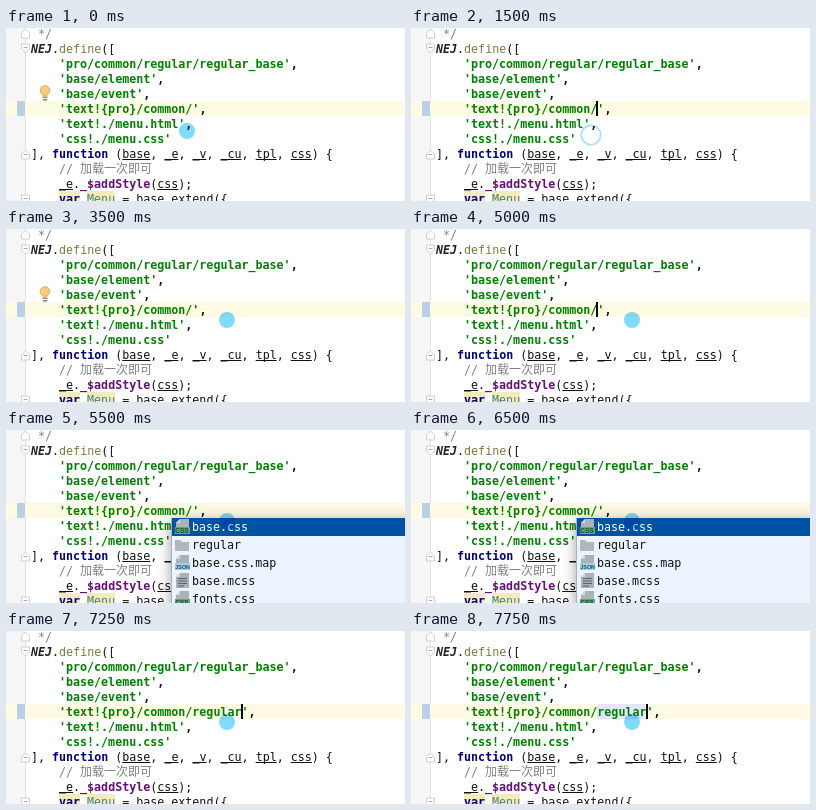
An HTML page with a canvas for the animation above (8 s loop, 399x173 px).

```html
<!DOCTYPE html>
<html lang="en">
<head>
<meta charset="utf-8">
<title>Path completion</title>
<style>
  html, body { margin: 0; width: 100%; height: 100%; overflow: hidden; background: #fff; }
  canvas { display: block; width: 399px; height: 173px; }
</style>
</head>
<body>
<canvas id="stage" width="399" height="173"></canvas>
<script>
const ctx = document.getElementById('stage').getContext('2d');
const W = 399, H = 173, LOOP = 8000;
const CHAR = 7.02, LEFT = 25, INDENT = 53, ROW = 15;
const MONO = '11.66px "DejaVu Sans Mono", monospace';
const STYLES = {
  plain: ['', '#111'],
  param: ['', '#111'],
  comma: ['bold ', '#111'],
  string: ['bold ', '#008000'],
  keyword: ['bold ', '#000080'],
  member: ['bold ', '#660e7a'],
  global: ['italic bold ', '#222'],
  method: ['', '#7a7a43'],
  local: ['', '#458383'],
  comment: ['', '#808080']
};

// Each entry lists the moment (ms) from which its values hold.
const pointerTrack = [
  [0, 181, 103], [250, 195, 102], [500, 187, 94], [750, 185, 91],
  [1000, 185, 87], [1250, 184, 87], [1500, 180, 107, 0.5],
  [1750, 217, 111, 0.5], [2000, 217, 111, 0.35], [2250, 221, 91]
];
const caretTrack = [
  [0, false], [1500, true], [2500, false], [3000, true], [3500, false],
  [4000, true], [5500, false], [6000, true], [6500, false], [6750, true]
];
const pathTrack = [
  [0, '/'], [4500, ''], [5000, '/'], [6750, '/reg'], [7000, '/regu'], [7250, '/regular']
];
const bulbTrack = [[0, true], [1500, false], [2500, true], [4500, false]];
const popupTrack = [[0, ''], [5500, 'files'], [6750, 'match'], [7250, '']];

const at = (track, t) => track.filter(entry => entry[0] <= t).pop().slice(1);
const baseline = row => 10 + ROW * row;

function rect(x, y, w, h, color) {
  ctx.fillStyle = color;
  ctx.fillRect(x, y, w, h);
}

function text(str, x, y, color, font = MONO) {
  ctx.font = font;
  ctx.fillStyle = color;
  ctx.fillText(str, x, y);
}

function polygon(points, fill, stroke) {
  ctx.beginPath();
  points.forEach(([x, y]) => ctx.lineTo(x, y));
  ctx.closePath();
  ctx.fillStyle = fill;
  ctx.fill();
  if (stroke) {
    ctx.strokeStyle = stroke;
    ctx.lineWidth = 1;
    ctx.stroke();
  }
}

// Tokens alternate between style and text.
function codeLine(row, x, ...tokens) {
  const y = baseline(row);
  for (let i = 0; i < tokens.length; i += 2) {
    const [weight, color] = STYLES[tokens[i]], str = tokens[i + 1];
    text(str, x, y, color, weight + MONO);
    if (tokens[i] === 'param') rect(x, y + 1, str.length * CHAR, 1, '#111');
    x += str.length * CHAR;
  }
}

function foldMark(y, dir, minus) {
  const x = 19.5;
  polygon([[x - 4, y - 4 * dir], [x + 4, y - 4 * dir], [x + 4, y + dir],
           [x, y + 5 * dir], [x - 4, y + dir]], '#fff', '#cfcfcf');
  if (minus) rect(x - 2, y - 1, 4, 1, '#aaa');
}

function bulb() {
  ctx.beginPath();
  ctx.arc(39, 62.5, 4.8, 0, Math.PI * 2);
  ctx.fillStyle = '#f8cb80';
  ctx.fill();
  ctx.strokeStyle = '#e0a95a';
  ctx.lineWidth = 1;
  ctx.stroke();
  rect(36.5, 66, 5, 3, '#f0bd70');
  rect(36.5, 69, 5, 1, '#888');
  rect(36.5, 71, 5, 1, '#888');
  rect(37.5, 72, 3, 1, '#aaa');
}

function editor(t, path, caretOn) {
  rect(0, 0, W, H, '#fff');
  rect(0, 0, 19, H, '#f6f6f6');
  rect(19, 0, 1, H, '#e4e4e4');
  rect(0, 73, W, ROW, '#fffae3');
  rect(11, 73, 8, ROW, '#b9d0e6');
  foldMark(6, -1, false);
  foldMark(20, 1, true);
  foldMark(127, -1, true);
  foldMark(171, 1, true);

  if (t >= 7750) rect(186, 73, 48, ROW, '#e4e4ff');
  rect(INDENT, 163, 3 * CHAR, ROW, '#f5eabb');
  rect(INDENT + 4 * CHAR, 163, 4 * CHAR, ROW, '#f5eabb');

  codeLine(0, LEFT, 'comment', ' */');
  codeLine(1, LEFT, 'global', 'NEJ', 'plain', '.', 'method', 'define', 'plain', '([');
  const modules = ['pro/common/regular/regular_base', 'base/element', 'base/event',
                   'text!{pro}/common' + path, 'text!./menu.html', 'css!./menu.css'];
  modules.forEach((name, i) =>
    codeLine(i + 2, INDENT, 'string', `'${name}'`, 'comma', i < 5 ? ',' : ''));

  const params = ['base', '_e', '_v', '_cu', 'tpl', 'css']
    .flatMap((name, i) => ['plain', i ? ', ' : '', 'param', name]);
  codeLine(8, LEFT, 'plain', '], ', 'keyword', 'function', 'plain', ' (', ...params, 'plain', ') {');
  codeLine(9, INDENT, 'comment', '// ');
  text('加载一次即可', INDENT + 3 * CHAR, baseline(9), '#808080',
       '12px "Noto Sans CJK SC", "Noto Sans CJK", sans-serif');
  codeLine(10, INDENT, 'param', '_e', 'plain', '.', 'member', '_$addStyle',
           'plain', '(', 'param', 'css', 'plain', ');');
  codeLine(11, INDENT, 'keyword', 'var', 'plain', ' ', 'local', 'Menu', 'plain', ' = base.extend({');

  const caretX = Math.floor(INDENT - 0.5 + (18 + path.length) * CHAR);
  if (caretOn) rect(caretX, 73, 2, ROW, '#000');
}

function folderIcon(y) {
  polygon([[169, y - 5], [174, y - 5], [176, y - 3], [183, y - 3], [183, y + 6], [169, y + 6]],
          '#b0b7bc');
}

function page(y) {
  polygon([[174, y - 8], [183, y - 8], [183, y + 7], [170, y + 7], [170, y - 4]], '#a9b2b8');
  polygon([[174, y - 8], [174, y - 4], [170, y - 4]], '#d5dadd');
}

function labelIcon(y, label, back, ink) {
  page(y);
  rect(169, y, 15, 7, back);
  text(label, 169.3, y + 6, ink, `bold ${label.length > 3 ? 5.4 : 6.5}px "Liberation Sans", sans-serif`);
}

function textIcon(y) {
  page(y);
  for (let line = 0; line < 4; line++) rect(172, y - 3 + line * 2.5, line < 3 ? 9 : 6, 1, '#59636a');
}

const icons = {
  css: y => labelIcon(y, 'CSS', '#5fa77c', '#1d4a30'),
  map: y => labelIcon(y, 'JSON', '#a5cfe6', '#1f4d66'),
  mcss: textIcon,
  regular: folderIcon
};

function popup(kind, path) {
  const names = kind === 'files'
    ? ['base.css', 'regular', 'base.css.map', 'base.mcss', 'fonts.css'] : ['regular'];
  const height = kind === 'files' ? 100 : 34;
  ctx.save();
  ctx.shadowColor = 'rgba(0,0,0,.38)';
  ctx.shadowBlur = 13;
  ctx.shadowOffsetY = 3;
  rect(165, 88, 260, height, '#ebf4fe');
  ctx.restore();
  rect(165, 88, 1, height, '#a8b2bc');
  rect(166, 88, W - 166, 18, '#0052a4');

  names.forEach((name, i) => {
    const y = 97 + 18 * i;
    icons[name.split('.').pop()](y);
    text(name, 186, y + 4, i ? '#111' : '#fff');
  });

  if (kind === 'match') {
    text(path.slice(1), 186, 101, '#f9eccc');
    rect(166, 106, W - 166, 16, '#f1f2f3');
    rect(165, 121, W - 165, 1, '#b4b4b4');
    const font = '11.3px "Open Sans", sans-serif';
    text('Use', 167, 117, '#222', font);
    text('⇧⌘⏎', 190.5, 117, '#222', '12px "DejaVu Sans", sans-serif');
    text('to syntactically correct your code', 226, 117, '#222', font);
  }
}

function pointer(x, y, ringAlpha) {
  ctx.save();
  ctx.globalCompositeOperation = 'multiply';
  ctx.beginPath();
  ctx.arc(x, y, ringAlpha ? 9.7 : 8, 0, Math.PI * 2);
  if (ringAlpha) {
    ctx.strokeStyle = `rgba(88,196,240,${ringAlpha})`;
    ctx.lineWidth = 1.8;
    ctx.stroke();
  } else {
    ctx.fillStyle = '#80dcff';
    ctx.fill();
  }
  ctx.restore();
}

function draw(now) {
  const t = now % LOOP;
  const [path] = at(pathTrack, t), [kind] = at(popupTrack, t);
  editor(t, path, at(caretTrack, t)[0]);
  if (at(bulbTrack, t)[0]) bulb();
  if (kind) popup(kind, path);
  pointer(...at(pointerTrack, t));
}

const start = performance.now();
function frame() {
  draw(performance.now() - start);
  requestAnimationFrame(frame);
}
frame();
</script>
</body>
</html>
```
